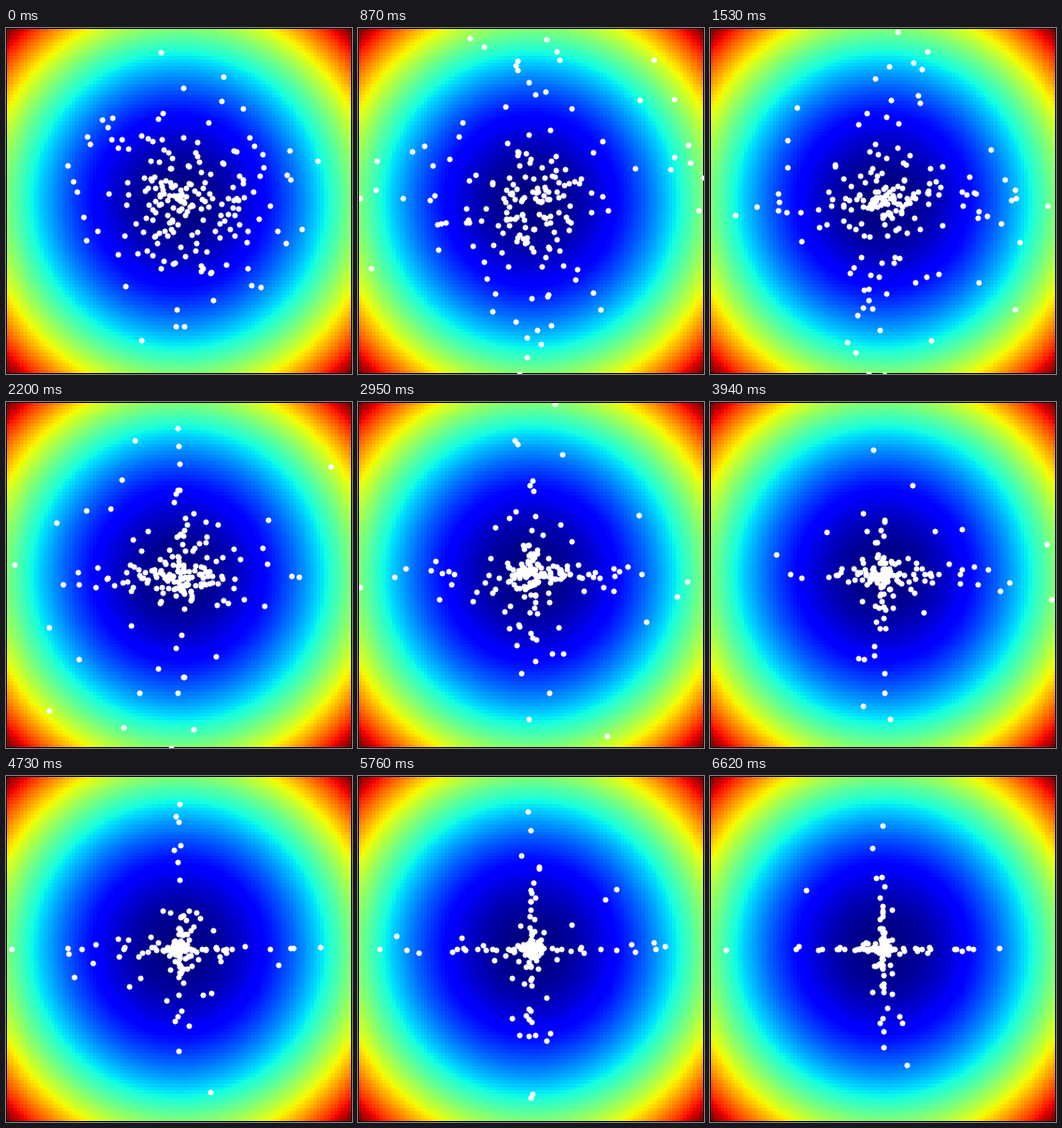
Animation of 371x370 px, one loop 8 s. Source, as a matplotlib script:

```python
import numpy as np
import matplotlib.pyplot as plt
from matplotlib.animation import FuncAnimation

W, H, DPI = 371, 370, 100
LOOP, TICK = 8000, 20
FIRST_JUMP, LAST_JUMP = 500, 6620
COUNT, STEPS = 200, 50
CENTRE = np.array([185.5, 185.0])


def first_swarm(rng):
    """A round cloud, denser in the middle and a little high."""
    radius = 175 * rng.beta(1.4, 2.5, COUNT)
    theta = rng.uniform(0, 2 * np.pi, COUNT)
    return np.column_stack([radius * np.cos(theta), radius * np.sin(theta) - 6])


def simulate():
    """Particle swarm whose typical distance to the best point decays."""
    rng = np.random.default_rng(7)
    pos = first_swarm(rng)
    vel = rng.normal(0, 14, pos.shape)
    path = [pos]
    for k in range(1, STEPS):
        pull = rng.uniform(0, 1.6, pos.shape) + rng.uniform(0, 1.6, pos.shape)
        vel = 0.72 * vel - pull * pos
        pos = pos + vel
        scale = 34 * np.exp(-k / 20) / np.median(np.abs(pos))
        pos, vel = pos * scale, vel * scale
        path.append(pos)
    return [p + CENTRE for p in path]


swarm = simulate()
jumps = np.linspace(FIRST_JUMP, LAST_JUMP, STEPS - 1)

# The black figure shows as a one-pixel frame around the axes
fig = plt.figure(figsize=(W / DPI, H / DPI), dpi=DPI, facecolor="black")
ax = fig.add_axes([1 / W, 1 / H, 1 - 2 / W, 1 - 2 / H])
ax.axis("off")

grid = np.linspace(-5, 5, 100)
bowl = grid[None, :] ** 2 + grid[:, None] ** 2
ax.imshow(bowl, cmap="jet", interpolation="nearest", aspect="auto",
          extent=(0.5, W - 0.5, H - 0.5, 0.5))
ax.set(xlim=(1, W - 1), ylim=(H - 1, 1))
dots, = ax.plot([], [], "o", color="white", ms=6 * 72 / DPI, mew=0)


def draw(frame):
    time = frame * TICK + TICK / 2
    dots.set_data(*swarm[np.searchsorted(jumps, time)].T)
    return dots,


anim = FuncAnimation(fig, draw, frames=LOOP // TICK, interval=TICK,
                     repeat=True, repeat_delay=0, blit=False)
plt.show()
```
